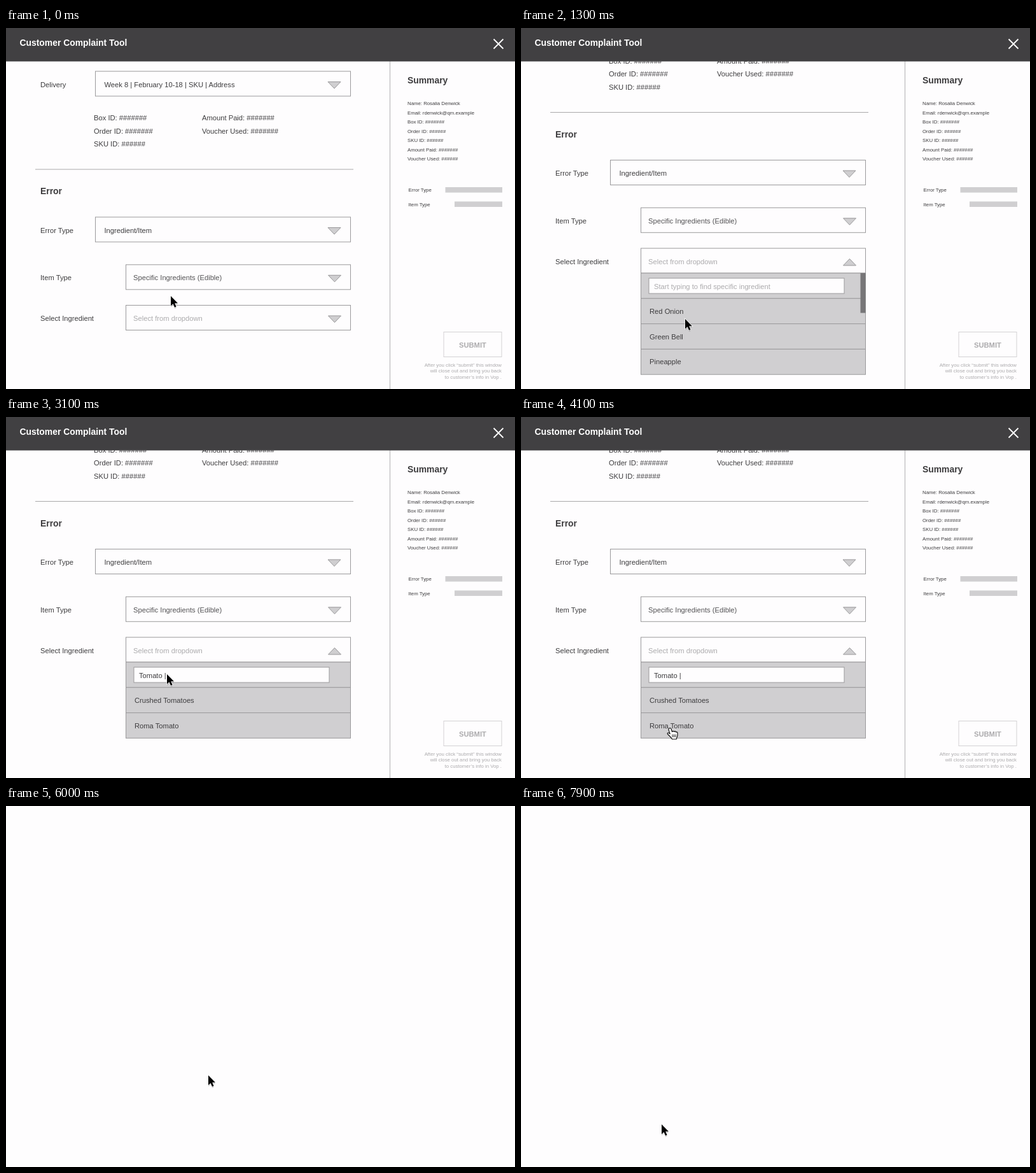
An HTML page that plays this animation: 800 by 567 pixels, repeating every 8000 ms.

```html
<!DOCTYPE html>
<html lang="en">
<head>
<meta charset="utf-8">
<title>Customer Complaint Tool</title>
<style>
  html, body { margin: 0; width: 100%; height: 100%; overflow: hidden; background: #fefdfe; }
  svg { display: block; width: 100vw; height: 100vh; }
  text { font: 11.2px "Liberation Sans", Arial, sans-serif; fill: #3d3c3e; white-space: pre; }
  .title { font-size: 13.9px; font-weight: bold; }
  .small { font-size: 7.8px; }
  .hint { fill: #acabad; }
  .dim { fill: #969597; }
  .soft { fill: #545355; }
  .field { fill: #fefdfe; stroke: #9b9a9c; }
  .panel { fill: #d0cfd1; stroke: #9b9a9c; }
  .arrow { fill: #cfced0; stroke: #99989a; }
  .bar { fill: #d0cfd1; }
  .rule { stroke: #a9a8aa; fill: none; }
</style>
</head>
<body>
<svg id="stage" viewBox="0 0 800 567">
  <g id="screens"></g>
  <g id="cursor">
    <g id="pointer">
      <path d="M0 2V17.5L3.6 14.2 6 19.8 8.6 18.7 6.2 13.2H11Z" fill="#000" opacity=".22"/>
      <path d="M0 0V15.5L3.6 12.2 6 17.8 8.6 16.7 6.2 11.2H11Z" stroke="#fff" stroke-width="1.4" paint-order="stroke"/>
    </g>
    <g id="hand" stroke="#111" stroke-width="1.2" stroke-linejoin="round">
      <path fill="#fff" d="M-1.6 1.6C-.6 0 1.4 .2 1.9 1.8L3.6 6.5C4.2 5 6 5 6.6 6.3 7.4 5.2 9.2 5.6 9.4 6.9 10.5 6.2 12 7 12 8.4V12C12 14 10.5 15.5 10.2 18H3.5C2.5 15.5-1 12.5-3.6 10-4.4 8.6-3 7.4-1.4 8.4L.2 9.6-2 3.4Z"/>
      <path fill="none" stroke-width="1" d="M4 10.5v4.5M6.5 10.5v4.5M9 10.5v4.5"/>
    </g>
  </g>
</svg>
<script>
const $ = id => document.getElementById(id);
const text = (x, y, label, cls = '', more = '') =>
  `<text x="${x}" y="${y}" class="${cls}" ${more}>${label}</text>`;
const rect = (x, y, w, h, cls) =>
  `<rect x="${x}" y="${y}" width="${w}" height="${h}" class="${cls}"/>`;
const triangle = (x, y, up) =>
  `<path class="arrow" d="${up ? `M${x} ${y + 10.5}h20l-10-10.5z` : `M${x} ${y}h20l-10 10.5z`}"/>`;

function field(y, label, value, { left = 188.5, cls = '', up = false } = {}) {
  const wide = left < 150;
  return text(54, y + 24.5, label) + rect(left, y, 541.5 - left, 39, 'field') +
    text(wide ? 154.5 : 200, y + 24.5, value, cls) +
    triangle(wide ? 506 : 506.5, y + 16.5, up);
}

function panel(y, rows) {
  return rows.map((row, i) => rect(188.5, y + i * 39.8, 353, 39.8, 'panel') +
    text(202, y + i * 39.8 + 24, row)).join('');
}

const searchBox = (y, value, cls = '') =>
  rect(201, y + 8, 307, 24, 'field') + text(209, y + 24.5, value, cls);

function summary(ingredientLabel, barLeft) {
  const facts = ['Name: Rosalia Denwick', 'Email: rdenwick@qm.example', 'Box ID: #######',
    'Order ID: ######', 'SKU ID: ######', 'Amount Paid: #######', 'Voucher Used: ######'];
  const choices = [['Error Type', 690.5], ['Item Type', 705]];
  if (ingredientLabel) choices.push([ingredientLabel, barLeft]);
  const note = ['After you click “submit” this window', 'will close out and bring you back',
    'to customer’s info in Vop .'];
  return '<path d="M603.5 52V567" stroke="#c6c5c7" stroke-width="1.5"/>' +
    text(631, 87, 'Summary', 'title') +
    facts.map((f, i) => text(631, 121 + i * 14.55, f, 'small')).join('') +
    choices.map(([label, x], i) => text(632.5, 257 + i * 22.5, label, 'small') +
      rect(x, 250 + i * 22.5, 780 - x, 8.5, 'bar')).join('') +
    '<rect x="688" y="477.5" width="91" height="39" fill="none" stroke="#d3d2d4"/>' +
    text(712, 502, 'SUBMIT', 'hint', 'font-weight="bold" style="font-weight:bold"') +
    note.map((n, i) => text(779, 531.5 + i * 9.6, n, 'small hint', 'text-anchor="end"')).join('');
}

const header = '<rect width="800" height="52.5" fill="#414042"/>' +
  text(21.5, 28, 'Customer Complaint Tool', 'title', 'style="fill:#fff"') +
  '<path d="M766.5 17.5l15 15m0-15l-15 15" stroke="#fff" stroke-width="1.8"/>';

const details = field(68, 'Delivery', 'Week 8 | February 10-18 | SKU | Address', { left: 140.5 }) +
  text(138, 145, 'Box ID: #######') + text(138, 165.5, 'Order ID: #######') +
  text(138, 186, 'SKU ID: ######') + text(308, 145, 'Amount Paid: #######') +
  text(308, 165.5, 'Voucher Used: #######') +
  '<path class="rule" d="M46 222H546"/>' + text(54, 261, 'Error', 'title') +
  field(297, 'Error Type', 'Ingredient/Item', { left: 140.5 }) +
  field(371.8, 'Item Type', 'Specific Ingredients (Edible)', { cls: 'soft' });

const screen = (scroll, body, side) =>
  `<g><rect width="800" height="567" fill="#fefdfe"/><g transform="translate(0 ${-scroll})">${details}${body}</g>${side}${header}</g>`;

const ingredient = (value, options) => field(435.5, 'Select Ingredient', value, options);
const subcategory = (value, options) => field(500.5, 'Error Subcategory', value, options);
const prompt = 'Select from dropdown';
const openList = ingredient(prompt, { cls: 'hint', up: true });

$('screens').innerHTML = [
  screen(0, ingredient(prompt, { cls: 'hint' }), summary()),
  screen(89.5, openList + panel(474.5, ['', 'Red Onion', 'Green Bell', 'Pineapple']) +
    searchBox(474.5, 'Start typing to find specific ingredient', 'hint') +
    '<rect x="533.5" y="474.5" width="8" height="62.5" fill="#777678"/>', summary()),
  screen(89.5, openList + panel(474.5, ['', 'Crushed Tomatoes', 'Roma Tomato']) +
    searchBox(474.5, 'Tomato |'), summary()),
  screen(100.5, ingredient('Roma Tomato') + subcategory(prompt, { cls: 'hint' }),
    summary('Ingredient', 690.5)),
  screen(100.5, ingredient('Roma Tomato') +
    subcategory('select from dropdown', { cls: 'dim', up: true }) +
    panel(539, ['Food Safety', 'Quality', 'Pick &amp; Pack']), summary('Select Ingredient', 701))
].join('');

const LOOP = 8000, TICK = 100;
// Visible span of each screen; the stage is blank in between.
const spans = [[0, 1000], [1300, 2800], [3100, 4500], [4800, 5900], [6200, 7800]];
const halfFaded = [6200, 7700];
const handSpans = [[500, 1100], [2200, 2900], [3700, 4600], [5400, 6000], [7300, 7900]];
// Cursor tip: time, x, y
const path = [
  [0, 259, 421], [300, 259, 421], [600, 258, 457], [1600, 258, 457], [2000, 261, 432],
  [2200, 251, 414], [2400, 253, 404], [3400, 253, 404], [3800, 231, 507], [4100, 234, 488],
  [5100, 234, 488], [5600, 318, 423], [6600, 318, 423], [7100, 231, 460],
  [7300, 219, 501], [7500, 221, 500], [LOOP, 221, 500]
];
const within = (t, [from, to]) => t >= from && t < to;
const screens = [...$('screens').children];

function draw(now) {
  const t = Math.floor(now % LOOP / TICK) * TICK;
  screens.forEach((el, i) => {
    el.style.display = within(t, spans[i]) ? '' : 'none';
    el.style.opacity = halfFaded.includes(t) ? .5 : 1;
  });
  const next = path.findIndex(p => p[0] > t);
  const [a, b] = [path[next - 1], path[next]];
  const k = (t - a[0]) / (b[0] - a[0]);
  const [x, y] = [1, 2].map(i => a[i] + (b[i] - a[i]) * k);
  $('cursor').setAttribute('transform', `translate(${x} ${y})`);
  const isHand = handSpans.some(span => within(t, span));
  $('hand').style.display = isHand ? '' : 'none';
  $('pointer').style.display = isHand ? 'none' : '';
}

const start = performance.now();
function frame() {
  draw(performance.now() - start);
  requestAnimationFrame(frame);
}
frame();
</script>
</body>
</html>
```
